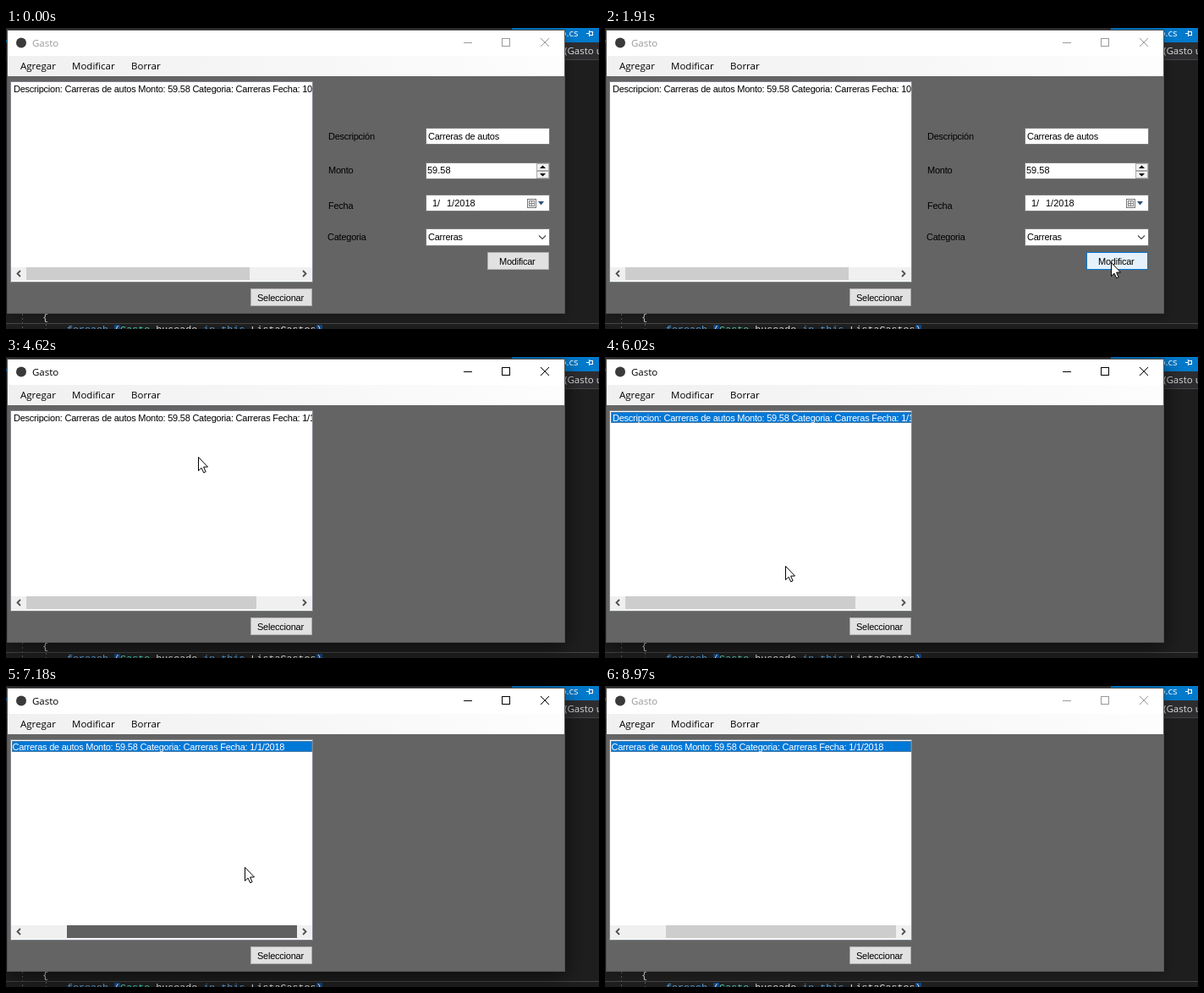
These frames come from a looping animation (701x356 px, 9050 ms). An HTML page with a canvas:

```html
<!DOCTYPE html>
<html lang="es">
<head>
<meta charset="utf-8">
<title>Gasto</title>
<style>
  html, body { margin: 0; width: 100%; height: 100%; overflow: hidden; background: #1e1e1e; }
  canvas { display: block; }
</style>
</head>
<body>
<canvas id="stage" width="701" height="356"></canvas>
<script>
const ctx = document.getElementById('stage').getContext('2d');
const LOOP = 9050;
const FORM = '11px "Liberation Sans", Arial, sans-serif';
const UI = '11.5px "Open Sans", "Noto Sans", sans-serif';
const CODE = '11.7px "Liberation Mono", monospace';

// Pointer moves: start, end, number of steps, evenly spaced waypoints
const MOVES = [
  [450, 1140, 10, [[672, 354], [660, 320], [634, 274], [620, 252]]],
  [1300, 1680, 6, [[620, 252], [612, 262], [598, 277]]],
  [3620, 3930, 5, [[598, 277], [450, 226], [312, 183]]],
  [4310, 4310, 1, [[312, 183], [313, 183]]],
  [4460, 4850, 6, [[313, 183], [227, 118], [128, 94]]],
  [5000, 5850, 12, [[128, 94], [136, 56], [150, 70], [180, 150], [212, 241]]],
  [6020, 6870, 12, [[212, 241], [215, 259], [222, 289], [245, 289], [276, 289]]],
  [6950, 7800, 12, [[276, 289], [282, 214], [281, 130], [277, 71]]],
  [7880, 7960, 2, [[277, 71], [347, 80]]],
  [8110, 8650, 8, [[347, 80], [440, 150], [560, 270], [598, 336]]]
];
const ACTIVATE = 2460, SAVED = 2610, SELECT = 5380, GRAB = 6440, RELEASE = 7400, LEAVE = 8970;

const clamp = (v, lo = 0, hi = 1) => Math.min(hi, Math.max(lo, v));
const ramp = (t, a, b) => clamp((t - a) / (b - a));
const inside = (p, x, y, w, h) => !!p && p[0] >= x && p[0] < x + w && p[1] >= y && p[1] < y + h;

function along(pts, u) {
  const f = u * (pts.length - 1);
  const i = Math.min(pts.length - 2, Math.floor(f));
  return pts[i].map((v, k) => Math.round(v + (pts[i + 1][k] - v) * (f - i)));
}

function pointerAt(t) {
  if (t >= LEAVE) return null;
  const move = MOVES.filter(m => t >= m[0]).pop();
  if (!move) return null;
  const [start, end, steps, pts] = move;
  const gap = steps > 1 ? (end - start) / (steps - 1) : 1;
  const step = Math.min(steps, Math.floor((t - start) / gap + 0.05) + 1);
  return along(pts, step / steps);
}

function rect(x, y, w, h, fill) {
  ctx.fillStyle = fill;
  ctx.fillRect(x, y, w, h);
}

function box(x, y, w, h, fill, edge) {
  rect(x, y, w, h, edge);
  rect(x + 1, y + 1, w - 2, h - 2, fill);
}

function text(str, x, y, font = FORM, color = '#000', spacing = 0) {
  ctx.font = font;
  ctx.letterSpacing = spacing + 'px';
  ctx.fillStyle = color;
  ctx.fillText(str, x, y);
}

const label = (str, x, y, color) => text(str, x, y, FORM, color, -0.24);

function line(pts, color, width = 1) {
  ctx.strokeStyle = color;
  ctx.lineWidth = width;
  ctx.beginPath();
  pts.forEach(([x, y]) => ctx.lineTo(x, y));
  ctx.stroke();
}

function shape(pts, fill) {
  ctx.beginPath();
  pts.forEach(([x, y]) => ctx.lineTo(x, y));
  ctx.closePath();
  ctx.fillStyle = fill;
  ctx.fill();
}

function button(str, x, y, tx, fill = '#e1e1e1', edge = '#adadad') {
  box(x, y, 73, 21, fill, edge);
  label(str, tx, y + 15);
}

function drawEditor() {
  rect(0, 0, 701, 356, '#1e1e1e');
  rect(0, 0, 701, 14, '#2d2d30');
  rect(598, 0, 103, 14, '#007acc');
  rect(0, 14, 701, 3, '#007acc');
  rect(0, 17, 701, 21, '#2d2d30');
  rect(0, 37, 701, 1, '#434346');
  text('RegistroDeGastoUI.cs', 42, 10, UI, '#d0d0d0');
  text('ModificacionGastoUI.cs', 208, 10, UI, '#d0d0d0');
  text('ModificacionGastoUI.cs [Design]', 382, 10, UI, '#d0d0d0');
  text('Repositorio.cs', 601, 10, UI, '#fff');
  text('(Gasto u', 660, 31, UI, '#dcdcdc');
  line([[686, 6.5], [689, 6.5]], '#fff');
  line([[689.5, 3], [689.5, 10]], '#fff');
  ctx.strokeRect(689.5, 4.5, 4, 4);

  ctx.setLineDash([2, 3]);
  line([[19.5, 338], [19.5, 356]], '#5a5a5a');
  line([[47.5, 350], [47.5, 356]], '#5a5a5a');
  ctx.setLineDash([]);
  text('{', 43, 346, CODE, '#dcdcdc');
  rect(0, 349, 701, 1, '#464646');
  rect(128, 351, 7, 5, '#0e4583');
  rect(367, 351, 7, 5, '#0e4583');
  let x = 72;
  const parts = [['foreach ', '#569cd6'], ['(', '#dcdcdc'], ['Gasto ', '#4ec9b0'],
    ['buscado ', '#dcdcdc'], ['in this', '#569cd6'], ['.ListaGastos)', '#dcdcdc']];
  for (const [str, color] of parts) {
    text(str, x, 360, CODE, color);
    x += ctx.measureText(str).width;
  }
}

function drawWindow(active) {
  ctx.save();
  ctx.shadowColor = active ? 'rgba(0,0,0,.6)' : 'rgba(0,0,0,.3)';
  ctx.shadowBlur = active ? 22 : 12;
  ctx.shadowOffsetY = active ? 5 : 2;
  rect(1, 2, 660, 336, '#555');
  ctx.restore();
  rect(2, 3, 658, 30, '#fff');
  const strip = ctx.createLinearGradient(2, 0, 660, 0);
  strip.addColorStop(0, '#f0f0f0');
  strip.addColorStop(1, '#fdfdfd');
  rect(2, 33, 658, 24, strip);
  rect(2, 57, 658, 280, '#646464');

  ctx.fillStyle = '#3a3a3a';
  ctx.beginPath();
  ctx.arc(18, 17.5, 6, 0, Math.PI * 2);
  ctx.fill();

  const ink = active ? '#000' : '#999';
  text('Gasto', 31, 22, UI, ink);
  line([[541, 17.5], [551, 17.5]], ink);
  ctx.strokeRect(586.5, 12.5, 9, 9);
  line([[632, 12], [642, 22]], ink);
  line([[642, 12], [632, 22]], ink);
  text('Agregar', 17, 49, UI);
  text('Modificar', 78, 49, UI);
  text('Borrar', 148, 49, UI);
}

function drawList(t, p) {
  const saved = t >= SAVED, selected = t >= SELECT;
  const grabbed = t >= GRAB && t < RELEASE;
  const scroll = t < GRAB ? 0 : t >= 6860 ? 1 : clamp((p[0] - 222) / 48);

  box(5, 63, 358, 238, '#fff', '#82878f');
  ctx.save();
  ctx.beginPath();
  ctx.rect(7, 65, 355, 218);
  ctx.clip();
  if (selected) {
    rect(7, 65, 355, 13, '#0078d7');
    ctx.setLineDash([1, 1]);
    ctx.strokeStyle = '#ff8728';
    ctx.lineWidth = 1;
    ctx.globalAlpha = 0.6;
    ctx.strokeRect(7.5, 65.5, 354, 12);
    ctx.globalAlpha = 1;
    ctx.setLineDash([]);
  }
  const date = saved ? '1/1/2018' : '10/2/2018';
  label('Descripcion: Carreras de autos Monto: 59.58 Categoria: Carreras Fecha: ' + date,
    9 - Math.round(62 * scroll), 76, selected ? '#fff' : '#000');
  ctx.restore();

  rect(6, 283, 356, 16, '#f0f0f0');
  line([[17, 287], [13.5, 290.5], [17, 294]], '#505050', 1.8);
  line([[351, 287], [354.5, 290.5], [351, 294]], '#505050', 1.8);
  const x = 24 + Math.round(48 * scroll), w = saved ? 272 : 264;
  const hover = inside(p, x, 283, w, 16);
  rect(x, 283, w, 15, grabbed ? '#606060' : hover ? '#a6a6a6' : '#cdcdcd');
}

function drawForm(t, p) {
  label('Descripción', 381, 132);
  label('Monto', 381, 172);
  label('Fecha', 381, 214);
  label('Categoria', 380, 251);

  box(496, 118, 147, 20, '#fff', '#7a7a7a');
  label('Carreras de autos', 499, 132);

  box(496, 159, 147, 20, '#fff', '#7a7a7a');
  text('59.58', 498, 172);
  box(627, 160, 15, 9, '#f0f0f0', '#acacac');
  box(627, 169, 15, 9, '#f0f0f0', '#acacac');
  shape([[631, 166], [634.5, 162.5], [638, 166]], '#000');
  shape([[631, 172], [634.5, 175.5], [638, 172]], '#000');

  box(496, 197, 147, 20, '#fff', '#7a7a7a');
  text('1/', 504, 211);
  text('1/2018', 521, 211);
  box(616, 202, 11, 11, '#f4f4f4', '#777');
  for (let i = 0; i < 3; i++) {
    rect(618, 204 + i * 3, 7, 1, '#8a8a8a');
    rect(618 + i * 3, 204, 1, 7, '#8a8a8a');
  }
  shape([[629, 205], [636, 205], [632.5, 209.5]], '#2f4f77');

  box(496, 237, 147, 21, '#fff', '#7a7a7a');
  const glow = ramp(t, 1040, 1140) * (1 - ramp(t, 1600, 1910));
  if (glow > 0) {
    ctx.globalAlpha = glow;
    box(496, 237, 147, 21, '#fff', '#171717');
    box(625, 237, 18, 21, '#e5f1fb', '#0078d7');
    ctx.globalAlpha = 1;
  }
  label('Carreras', 499, 251);
  line([[630, 245.5], [634, 249.5], [638, 245.5]], '#444', 1.1);

  const hover = inside(p, 569, 265, 73, 21);
  const look = !hover ? [] : t >= ACTIVATE ? ['#cce4f7', '#005499'] : ['#e5f1fb', '#0078d7'];
  button('Modificar', 569, 265, 583, ...look);
}

function drawPointer([x, y]) {
  ctx.save();
  ctx.translate(x + 0.5, y + 0.5);
  shape([[0, 0], [0, 16], [3.6, 12.7], [6.2, 18.3], [8.6, 17.2], [6.1, 11.6], [11, 11.5]], '#fff');
  ctx.strokeStyle = '#000';
  ctx.lineWidth = 1;
  ctx.stroke();
  ctx.restore();
}

function draw(t) {
  const p = pointerAt(t);
  drawEditor();
  drawWindow(t >= ACTIVATE && t < LEAVE);
  drawList(t, p);
  button('Seleccionar', 289, 308, 297);
  if (t < SAVED) drawForm(t, p);
  if (p) drawPointer(p);
}

const began = performance.now();
function tick() {
  draw((performance.now() - began) % LOOP);
  requestAnimationFrame(tick);
}
tick();
</script>
</body>
</html>
```
